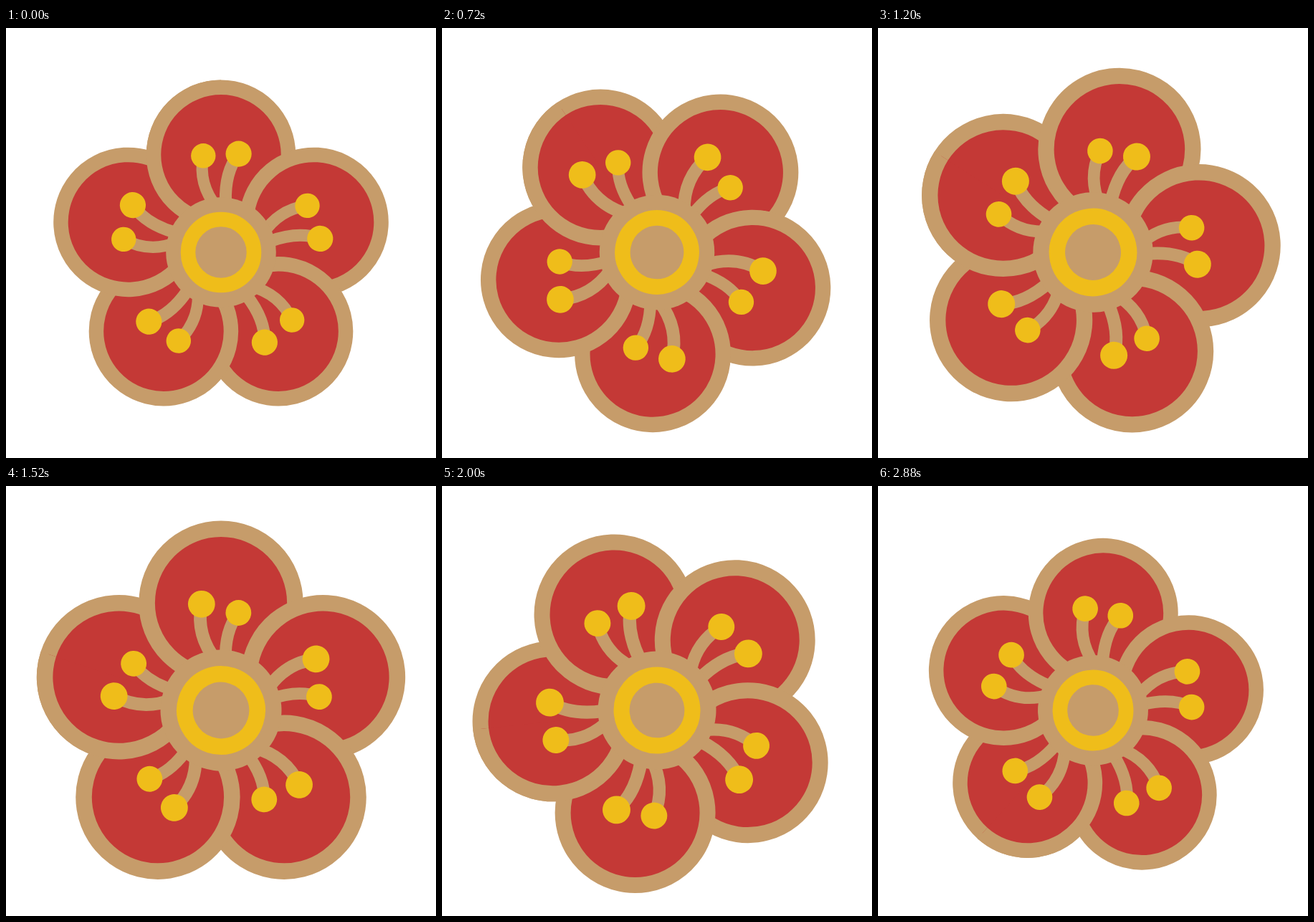
Animation, 600 px wide and 600 px high, one loop 2.96 s. Source, as an HTML page:

```html
<!DOCTYPE html>
<html lang="en">
<head>
<meta charset="utf-8">
<title>Plum blossom</title>
<style>
  html, body { margin: 0; width: 100%; height: 100%; overflow: hidden; background: #fff; }
  svg { display: block; width: 100%; height: 100%; }
</style>
</head>
<body>
<svg viewBox="0 0 600 600">
  <defs>
    <clipPath id="half"><rect x="-150" y="-300" width="150" height="300"/></clipPath>
    <circle id="petal" cy="-136.2" r="94" fill="#c43936" stroke="#c69c6a" stroke-width="20.5"/>
  </defs>
  <g id="flower">
    <g id="petals"></g>
    <g id="stamens"></g>
    <circle r="76.8" fill="#c69c6a"/>
    <circle r="46" fill="none" stroke="#efbd1a" stroke-width="20.6"/>
  </g>
</svg>
<script>
const LOOP = 2960, STEP = 80, TICK = 25, TURN = 120, SWAY = 40;
const $ = id => document.getElementById(id);

function add(parent, tag, attrs) {
  const el = document.createElementNS('http://www.w3.org/2000/svg', tag);
  for (const key in attrs) el.setAttribute(key, attrs[key]);
  return parent.appendChild(el);
}

const kinds = [
  { x: -26, y: -141.8, stem: 'Q-34 -100 -6 -66', shift: 10, els: [] },
  { x: 24.6, y: -137.4, stem: 'Q5 -112 6.5 -70', shift: 0, els: [] }
];

for (let i = 0; i < 5; i++) {
  const transform = `rotate(${i * 72})`;
  add($('petals'), 'use', { href: '#petal', transform });
  const pair = add($('stamens'), 'g', { transform });
  for (const { x, y, stem, els } of kinds) {
    const g = add(pair, 'g', {});
    add(g, 'path', { d: `M${x} ${y}${stem}`, fill: 'none', stroke: '#c69c6a', 'stroke-width': 17 });
    add(g, 'circle', { cx: x, cy: y, r: 18.1, fill: '#efbd1a' });
    els.push(g);
  }
}
// The first petal's left half covers the last one, closing the ring of overlaps.
add(add($('petals'), 'g', { 'clip-path': 'url(#half)' }), 'use', { href: '#petal' });

// Eased swing 0 -> 1 -> 0 over one period.
function swing(n, period) {
  const u = (n % period) / period * 2;
  const v = u < 1 ? u : 2 - u;
  return v * v * (3 - 2 * v);
}

function draw(ms) {
  const t = Math.floor((ms % LOOP) / STEP) * STEP;
  const n = Math.floor(t / TICK);
  const size = 1 + 0.1 * swing(n, TURN);
  $('flower').setAttribute('transform', `translate(300 313) rotate(${-1.2 * n}) scale(${size})`);
  for (const { shift, els } of kinds) {
    const s = 1 - 0.1 * swing(n + shift, SWAY);
    for (const el of els) el.setAttribute('transform', `scale(${s})`);
  }
}

const start = performance.now();
function tick() {
  draw(performance.now() - start);
  requestAnimationFrame(tick);
}
draw(0);
requestAnimationFrame(tick);
</script>
</body>
</html>
```
